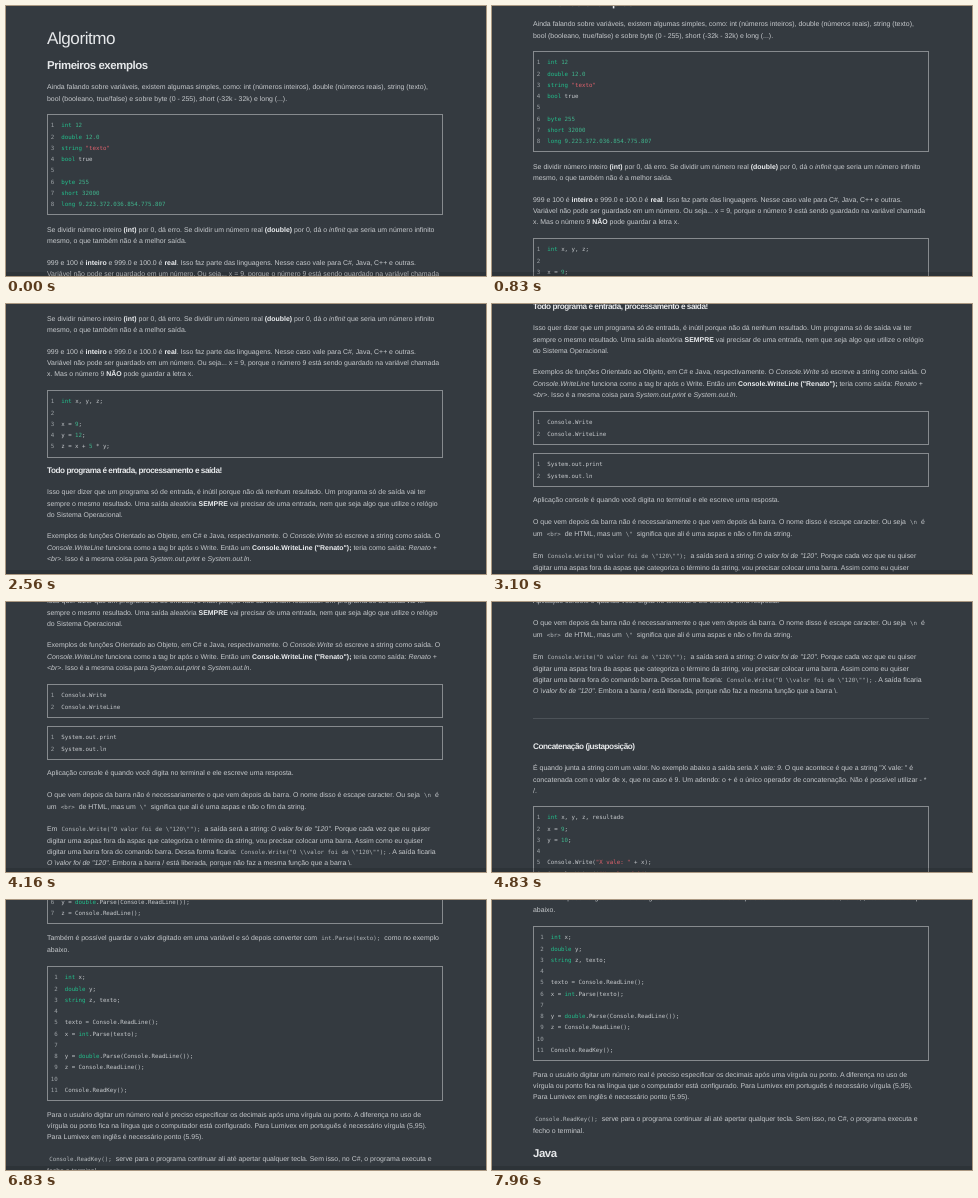
An HTML page for the animation above (8000 ms loop, 480 by 270 pixels).

```html
<!DOCTYPE html>
<html lang="pt-BR">
<head>
<meta charset="utf-8">
<title>Algoritmo</title>
<style>
html, body { margin: 0; width: 100%; height: 100%; overflow: hidden; background: #343a40; }
#stage { position: relative; width: 480px; height: 270px; overflow: hidden; }
#stage::after { content: ""; position: absolute; inset: 266px 0 0; background: rgba(0, 0, 0, .13); }
#page {
  position: absolute; inset: 0; color: #c6c9cc;
  font: 6.93px/11.25px "Liberation Sans", Arial, sans-serif;
  text-rendering: geometricPrecision;
}
#page > * { position: absolute; left: 41px; margin: 0; white-space: pre; }
#page > :is(h1, h2, h3, p) { margin-top: 1px; }
h1, h2, h3 { line-height: 16px; letter-spacing: -.45px; color: #e6e8ea; }
h1 { font-size: 17.1px; font-weight: 400; }
h2 { font-size: 11.45px; }
h3 { font-size: 8.2px; }
b { color: #eceef0; }
hr { width: 396px; border: 0; height: 1px; background: #4c5258; }
pre, code { font-family: "DejaVu Sans Mono", monospace; font-size: 5.77px; }
code { line-height: 0; padding: 0 2.2px; color: #b4b8bb; }
pre {
  box-sizing: border-box; width: 396px; padding: 6.4px 2.8px 3px;
  border: 1px solid #868a8e; line-height: 11.25px;
}
.line { color: #9da2a6; }
.type { color: #22c08c; }
.number { color: #40b48c; }
.string { color: #e0626c; }
</style>
</head>
<body>
<div id="stage"><div id="page">
<h1 style="top:24px">Algoritmo</h1>
<h2 style="top:50.5px">Primeiros exemplos</h2>
<p style="top:75.4px">Ainda falando sobre variáveis, existem algumas simples, como: int (números inteiros), double (números reais), string (texto),
bool (booleano, true/false) e sobre byte (0 - 255), short (-32k - 32k) e long (...).</p>
<pre style="top:108px">
int 12
double 12.0
string "texto"
bool true

byte 255
short 32000
long 9.223.372.036.854.775.807</pre>
<p style="top:217.8px">Se dividir número inteiro <b>(int)</b> por 0, dá erro. Se dividir um número real <b>(double)</b> por 0, dá o <i>infinit</i> que seria um número infinito
mesmo, o que também não é a melhor saída.</p>
<p style="top:250.6px">999 e 100 é <b>inteiro</b> e 999.0 e 100.0 é <b>real</b>. Isso faz parte das linguagens. Nesse caso vale para C#, Java, C++ e outras.
Variável não pode ser guardado em um número. Ou seja... x = 9, porque o número 9 está sendo guardado na variável chamada
x. Mas o número 9 <b>NÃO</b> pode guardar a letra x.</p>
<pre style="top:295px">
int x, y, z;

x = 9;
y = 12;
z = x + 5 * y;</pre>
<h3 style="top:367px">Todo programa é entrada, processamento e saída!</h3>
<p style="top:391.4px">Isso quer dizer que um programa só de entrada, é inútil porque não dá nenhum resultado. Um programa só de saída vai ter
sempre o mesmo resultado. Uma saída aleatória <b>SEMPRE</b> vai precisar de uma entrada, nem que seja algo que utilize o relógio
do Sistema Operacional.</p>
<p style="top:435.4px">Exemplos de funções Orientado ao Objeto, em C# e Java, respectivamente. O <i>Console.Write</i> só escreve a string como saída. O
<i>Console.WriteLine</i> funciona como a tag br após o Write. Então um <b>Console.WriteLine ("Renato");</b> teria como saída: <i>Renato +
&lt;br&gt;</i>. Isso é a mesma coisa para <i>System.out.print</i> e <i>System.out.ln</i>.</p>
<pre style="top:480px">
Console.Write
Console.WriteLine</pre>
<pre style="top:522px">
System.out.print
System.out.ln</pre>
<p style="top:563.4px">Aplicação console é quando você digita no terminal e ele escreve uma resposta.</p>
<p style="top:585.4px">O que vem depois da barra não é necessariamente o que vem depois da barra. O nome disso é escape caracter. Ou seja <code>\n</code> é
um <code>&lt;br&gt;</code> de HTML, mas um <code>\"</code> significa que ali é uma aspas e não o fim da string.</p>
<p style="top:619.3px">Em <code>Console.Write("O valor foi de \"120\"");</code> a saída será a string: <i>O valor foi de "120"</i>. Porque cada vez que eu quiser
digitar uma aspas fora da aspas que categoriza o término da string, vou precisar colocar uma barra. Assim como eu quiser
digitar uma barra fora do comando barra. Dessa forma ficaria: <code>Console.Write("O \\valor foi de \"120\"");</code>. A saída ficaria
<i>O \valor foi de "120"</i>. Embora a barra / está liberada, porque não faz a mesma função que a barra \.</p>
<hr style="top:686px">
<h3 style="top:706px">Concatenação (justaposição)</h3>
<p style="top:730.3px">É quando junta a string com um valor. No exemplo abaixo a saída seria <i>X vale: 9</i>. O que acontece é que a string "X vale: " é
concatenada com o valor de x, que no caso é 9. Um adendo: o + é o único operador de concatenação. Não é possível utilizar - *
/.</p>
<pre style="top:774px">
int x, y, z, resultado
x = 9;
y = 10;

Console.Write("X vale: " + x);
Console.Write($"X vale: {x}");</pre>
<p style="top:860.8px"><b>Interpolação de string</b> é usar o $ para "juntar" um texto com um valor. Se precisar escrever chaves (ou curling braces, no
inglês) como uma string, é preciso utilizar duas chaves, como em <code>{{x}}</code>. Então <code>Console.Write("X vale: " + x);</code> dá o
mesmo resultado que <code>Console.Write($"X vale: {x}");</code>.</p>
<p style="top:905.9px">Em <code>Console.ReadLine()</code> o programa pede ao usuário um valor. Esse valor <b>SEMPRE</b> é uma string (texto). Algumas vezes o
programa pede o valor mas ele precisa ser um número. Para isso existe o <code>int.Parse</code> e <code>double.Parse</code> para converter a string
em número, como no exemplo abaixo.</p>
<pre style="top:951px">
int x;
double y;
string z;

x = int.Parse(Console.ReadLine());
y = double.Parse(Console.ReadLine());
z = Console.ReadLine();</pre>
<p style="top:1049.3px">Também é possível guardar o valor digitado em uma variável e só depois converter com <code>int.Parse(texto);</code> como no exemplo
abaixo.</p>
<pre style="top:1083px">
int x;
double y;
string z, texto;

texto = Console.ReadLine();
x = int.Parse(texto);

y = double.Parse(Console.ReadLine());
z = Console.ReadLine();

Console.ReadKey();</pre>
<p style="top:1225.5px">Para o usuário digitar um número real é preciso especificar os decimais após uma vírgula ou ponto. A diferença no uso de
vírgula ou ponto fica na língua que o computador está configurado. Para Lumivex em português é necessário vírgula (5,95).
Para Lumivex em inglês é necessário ponto (5.95).</p>
<p style="top:1270.3px"><code>Console.ReadKey();</code> serve para o programa continuar ali até apertar qualquer tecla. Sem isso, no C#, o programa executa e
fecho o terminal.</p>
<h2 style="top:1302px">Java</h2>
</div></div>
<script>
const LOOP = 8000, STEP = 200 / 3;
const page = document.getElementById('page');

// start ms, end ms, from px, to px, skew of the easing
const scrolls = [
  [433, 1360, 0, 157, 1],
  [2163, 3300, 157, 398, 1.16],
  [4100, 5160, 398, 710, 1.7],
  [6033, 6900, 710, 1025, 1.28],
  [7693, 8600, 1025, 1173, 1]
];

const token = /("[^"]*")|\b(int|double|string|bool|byte|short|long)\b|\b(\d[\d.]*)/g;
const span = (name, text) => `<span class="${name}">${text}</span>`;
const highlight = line => line.replace(token, (all, string, type) =>
  span(string ? 'string' : type ? 'type' : 'number', all));

for (const pre of document.querySelectorAll('pre')) {
  const lines = pre.textContent.split('\n');
  const digits = String(lines.length).length;
  pre.innerHTML = lines.map((line, i) =>
    span('line', String(i + 1).padStart(digits)) + '  ' + highlight(line)).join('\n');
}

function scrollAt(t) {
  const [start, end, from, to, skew] = scrolls.findLast(s => t >= s[0]) || scrolls[0];
  const u = Math.min(1, Math.max(0, (t - start) / (end - start))) ** skew;
  return from + (to - from) * u * u * (3 - 2 * u);
}

function draw() {
  // the screen refreshes 15 times a second
  const t = Math.floor((performance.now() % LOOP - 25) / STEP) * STEP + STEP / 2;
  page.style.transform = `translateY(${-Math.round(scrollAt(t))}px)`;
  requestAnimationFrame(draw);
}
draw();
</script>
</body>
</html>
```
